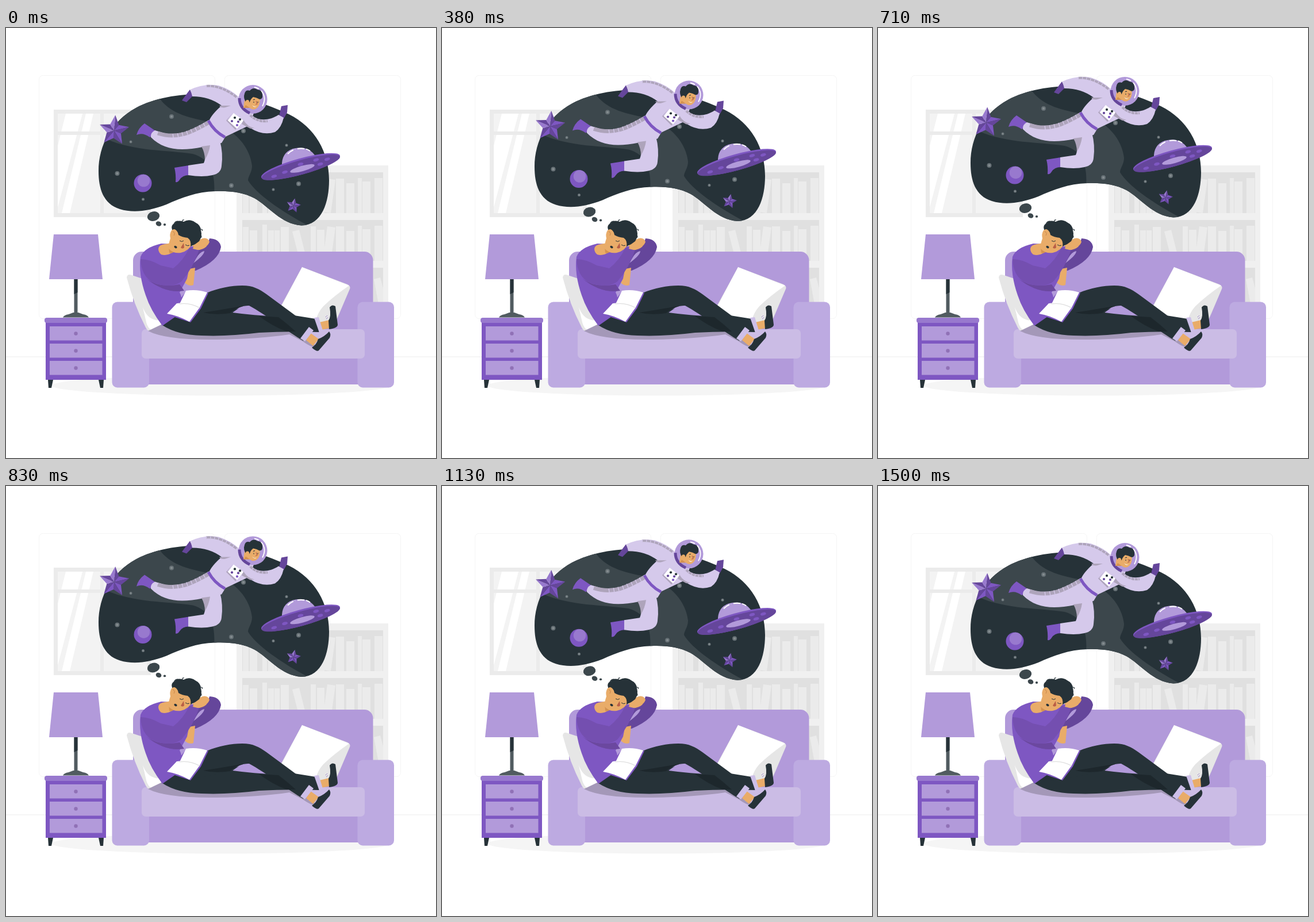
An HTML page with a canvas for the animation above (1.54 s loop, 748 by 748 pixels).

```html
<!DOCTYPE html>
<html lang="en">
<head>
<meta charset="utf-8">
<title>Space dream</title>
<style>
html, body { margin: 0; width: 100%; height: 100%; overflow: hidden; background: #fff; }
canvas { display: block; }
</style>
</head>
<body>
<canvas id="stage" width="748" height="748"></canvas>
<script>
const ctx = document.getElementById('stage').getContext('2d');
const INK = '#263238', SLATE = '#3c474c', PURPLE = '#7e57c2', DEEP = '#65469b';
const MID = '#9879ce', LILAC = '#b29ada', SUIT = '#d5c9eb', SKIN = '#e9ac69';
const SEAM = '#aea4bb', PALE = '#ebebeb', MIST = '#f5f5f5', WHITE = '#fff';

const fill = (color, d) => { ctx.fillStyle = color; ctx.fill(new Path2D(d)); };
const line = (color, width, d, dash = []) => {
  ctx.strokeStyle = color;
  ctx.lineWidth = width;
  ctx.setLineDash(dash);
  ctx.stroke(new Path2D(d));
  ctx.setLineDash([]);
};
const rect = (color, x, y, w, h, r = 0) => {
  ctx.fillStyle = color;
  ctx.beginPath();
  ctx.roundRect(x, y, w, h, r);
  ctx.fill();
};
const oval = (color, x, y, rx, ry = rx, turn = 0) => {
  ctx.fillStyle = color;
  ctx.beginPath();
  ctx.ellipse(x, y, rx, ry, turn, 0, 7);
  ctx.fill();
};
const clipped = (d, draw) => {
  ctx.save();
  ctx.clip(new Path2D(d));
  draw();
  ctx.restore();
};

function room() {
  rect(WHITE, 0, 0, 748, 748);
  ctx.strokeStyle = MIST;
  ctx.lineWidth = 1;
  for (const x of [57.5, 380.5]) {
    ctx.beginPath();
    ctx.roundRect(x, 82.5, 306, 423, 7);
    ctx.stroke();
  }
  rect(PALE, 0, 571.5, 748, 1);

  rect(PALE, 83, 142, 169, 187);
  rect('#f3f3f3', 90, 149, 155, 173);
  clipped('M90 149H164V322H90Z', () => {
    fill(WHITE, 'M104 149H133L90 312V205Z');
    fill(WHITE, 'M139 149H152L111 322H97Z');
  });
  rect(PALE, 164, 149, 6, 173);
  rect(PALE, 90, 180, 155, 6);

  rect('#f0f0f0', 401, 239, 264, 270);
  rect('#e0e0e0', 411, 251, 245, 258);
  for (const y of [-83, 0]) {
    const books = [[412, 346, 10], [424, 352, 13], [446, 342, 8], [456, 352, 10], [467, 352, 9],
      [478, 346, 14], [530, 345, 9], [541, 351, 13], [574, 345, 14], [592, 353, 14],
      [612, 344, 7], [620, 350, 14], [641, 344, 14]];
    for (const [x, top, w] of books) rect(PALE, x, top + y, w, 405 - top);
    ctx.save();
    ctx.translate(0, y);
    fill(PALE, 'M498 354L510 351L523 403L511 405ZM559 345L573 347L565 405L551 403Z');
    ctx.restore();
  }
  fill(PALE, 'M640 437L651 434L663 480H648Z');
  rect('#f0f0f0', 401, 322, 264, 12);
  rect('#f0f0f0', 401, 405, 264, 12);
  rect('#f0f0f0', 656, 239, 9, 270);
  oval(MIST, 374, 622, 294, 17.5);
}

function furniture() {
  rect(LILAC, 221, 389, 417.5, 200, 15);
  rect(LILAC, 235, 560, 390, 60);
  rect('#bdaae1', 184.5, 476.5, 64.5, 149, 9);
  rect('#bdaae1', 611.5, 476.5, 63.5, 149, 9);
  rect('#cbbce5', 236, 524, 388, 51, 7);

  fill(LILAC, 'M83 359H160L168 437H75Z');
  rect('#515b60', 118.5, 437, 6, 64);
  fill(INK, 'M118.5 437H124.5V460L118.5 463Z');
  fill('#515b60', 'M99 503.5Q101 499 109 498L117 495H126L134 498Q142 499 144 503.5Z');
  rect(PURPLE, 69, 511, 105, 101);
  rect(MID, 67, 504, 109, 9, 4);
  for (const y of [519, 549, 579]) {
    rect(LILAC, 76, y, 91.5, 24.5);
    oval('#9071b6', 121.5, y + 12.5, 3.2);
  }
  fill(INK, 'M73 612H82L79 626H74ZM161 612H170L169 626H164Z');

  fill('#e6e6e6', 'M515 416L594 446Q600 449 598 454L572 515Q568 524 552 522L490 510L478 484Z');
  fill(WHITE, 'M515 416L597 448Q572 465 552 484Q542 495 538 511L500 508L479 484Z');
  fill('#e6e6e6', 'M210 434Q211 427 219 430L240 437L276 516L258 527Q248 531 243 521Q222 480 210 434Z');
  fill(WHITE, 'M238 486Q248 512 272 508L276 516L258 527Q248 526 244 512Z');
}

function legs() {
  fill('#a498b8', 'M247 527L274 514L515 526L541 556Q533 557 516 545L493 533Q440 541 365 542Q278 543 247 527Z');
  fill(INK, 'M280 506Q330 480 375 491L420 487L539 506L545 529Q490 527 440 530Q385 537 340 535Q298 534 272 517Z');
  fill(LILAC, 'M394 495Q408 484 423 483Q448 487 475 502Q430 500 394 495Z');
  fill(INK, 'M272 517L307 494L349 461C370 452 392 448 411 448C430 448 440 454 453 463L533 522L517 544C491 529 451 498 423 483Q406 482 394 495L340 507Z');
  fill('#1d272c', 'M343 495Q375 490 416 483Q398 487 390 496Q364 500 343 495Z');
  fill('#1d272c', 'M440 501L474 503Q490 515 504 528L488 528Q462 518 440 501Z');

  fill(SKIN, 'M545 512L562 508L564 522L548 525Z');
  fill('#cdbfe8', 'M536 504L544 503L551 526L545 530Z');
  fill(INK, 'M563 486Q567 480 573 484L577 516Q577 522 562 524L561 509Q566 502 563 486Z');
  line(PURPLE, 1, 'M556 503L559 500M557 506L561 503', [1.5, 1]);
  fill(SKIN, 'M530 531L544 541L534 553L522 543Z');
  fill('#cdbfe8', 'M527 520L535 526L520 545L512 540Z');
  fill(INK, 'M562 528Q566 532 563 539L544 561Q541 564 532 556Q540 551 543 541Q554 537 562 528Z');
}

function sleeper() {
  fill(DEEP, 'M335 386Q350 382 354 366Q372 367 374 381Q370 405 330 422L307 424L315 399Z');
  fill(LILAC, 'M330 402Q337 389 345 388Q345 395 326 409Z');
  fill(SKIN, 'M314 420L329 417L326 447Q317 451 307 439Z');
  fill(SKIN, 'M320 386Q329 370 342 366Q351 364 354 372Q350 383 333 386Z');

  fill(PURPLE, 'M234 398Q240 382 270 375L300 376L326 380L315 436L302 460Q311 475 295 502L272 518Q251 490 243 465Q230 428 234 398Z');
  fill('#6b489f', 'M244 436Q266 453 302 446L310 457Q278 463 244 436Z');
  fill('#744fb0', 'M234 402Q250 402 269 413L291 418Q309 404 319 382L336 386Q326 417 305 441Q288 454 256 443Q235 431 234 402Z');
  fill(SKIN, 'M265 384Q266 377 276 376L287 374L290 390Q280 397 270 394Q265 390 265 384Z');
  fill('#d39150', 'M283 380L293 389Q288 393 284 391Z');

  fill(SKIN, 'M288 352Q284 358 286 366Q282 377 283 384Q292 393 304 391Q318 388 325 374L322 350L301 343Z');
  fill(INK, 'M289 351Q286 343 293 340Q297 333 309 337Q319 331 329 338Q339 343 339 352Q342 362 336 371Q329 377 321 380Q323 370 316 365Q306 364 300 360Q299 350 289 351Z');
  line(INK, 1.2, 'M292 341Q294 336 299 336M307 337Q306 333 310 334M338 350Q343 350 341 353M336 360Q342 361 339 365');
  oval(SKIN, 292, 357.5, 5.5, 7.5, 0.2);
  line('#c5864b', 1, 'M290 354Q295 356 292 361');
  line(INK, 1, 'M302 370Q306 373 309 370M312 377Q316 380 319 378');
  fill('#b95e46', 'M309 374L304 382Q307 385 310 382Z');
  oval(INK, 295, 381, 2.8, 1.9, 0.5);
  fill(SKIN, 'M325 384Q331 372 341 374L349 380Q342 386 333 386Z');

  fill(PURPLE, 'M314 457L352 461L339 488L321 512L282 499Z');
  fill(WHITE, 'M313 457Q332 454 350 460L337 486Q320 478 302 480Z');
  fill(WHITE, 'M297 479Q320 476 337 486L319 511Q299 500 280 497Z');
  line('#dedede', 1.2, 'M301 480Q320 477 337 487');
}

const CLOUD = 'M161 249C161 203 184 162 226 139C266 118 319 112 370 116C414 119 453 132 492 150C538 173 562 216 562 265C562 302 550 343 514 343.500C478 341 457 310 432 296C413 286 389 283 364 284C331 285 306 295 279 307C248 319 221 322 198 315C169 306 161 279 161 249Z';

function star(x, y, size, angle) {
  const point = i => {
    const a = angle + i * Math.PI / 5, r = i % 2 ? size * 0.48 : size;
    return [x + r * Math.cos(a), y + r * Math.sin(a)];
  };
  for (let i = 0; i < 10; i++) {
    ctx.beginPath();
    ctx.moveTo(x, y);
    ctx.lineTo(...point(i));
    ctx.lineTo(...point(i + 1));
    ctx.fillStyle = i % 2 ? (i > 5 ? MID : PURPLE) : DEEP;
    ctx.fill();
  }
}

function space() {
  fill(INK, CLOUD);
  clipped(CLOUD, () => fill(SLATE, 'M264 118C280 143 305 154 348 162C402 174 425 211 428 240C428 251 421 258 421 265C435 289 482 321 530 346L440 360L362 290C364 260 360 229 325 219C280 212 224 215 174 193L200 100Z'));
  for (const [x, y, r] of [[288, 154, 4], [413, 179, 4], [193.5, 253, 4], [392, 274, 4], [509, 271, 4],
    [217, 198, 2.5], [488, 204, 2.5], [465, 281, 2.5], [238.5, 298, 2.5]]) {
    oval('#667075', x, y, r);
    oval('#858d90', x, y, r * 0.5);
  }
  oval(PURPLE, 238, 270, 15.5);
  oval(MID, 239.500, 265.500, 10.8);
  star(188, 178.5, 27, -1.49);
  star(500, 309, 13, -1.37);
  oval(SLATE, 256.500, 327.500, 10.8, 8.3, -0.25);
  oval(SLATE, 265.500, 340.500, 5, 4, 0.4);
  oval(SLATE, 276, 342, 2.2, 1.9);
}

function saucer() {
  fill(LILAC, 'M480 240Q479 217 499 210Q526 203 539 224Q526 240 480 240Z');
  line(WHITE, 2, 'M490 219Q496 213 503 211M507 210Q521 208 529 214', [12, 3]);
  ctx.save();
  ctx.translate(512.5, 241);
  ctx.rotate(-0.27);
  oval(PURPLE, 0, 0, 71, 14);
  oval(DEEP, 0, 1.5, 70.5, 12.5);
  oval(LILAC, 2, 4, 22, 4.8);
  for (const [x, y] of [[-49, 4], [-29, 2], [1, -4], [29, -4], [48, 0], [34, 5]]) oval(PURPLE, x, y, 5, 2.6);
  ctx.restore();
}

function astronaut() {
  fill(PURPLE, 'M227 186Q230 174 241 166L260 179Q256 187 250 190Q238 181 227 186Z');
  fill(SUIT, 'M353 160C331 172 310 191 279 184L259 178Q251 182 252 190C274 212 302 215 342 207L375 200L383 187Z');
  line(SEAM, 7, 'M264 183C298 194 322 182 355 163');
  line(SUIT, 7, 'M290 188C315 185 333 175 353 164', [1.3, 7]);
  fill(PURPLE, 'M293 243L318 239L318 256Q307 256 302 264Q299 269 295 268Q296 255 293 243Z');
  fill(SUIT, 'M342 203Q351 217 344 235L317 239V256Q342 260 359 256Q374 253 375 240Q378 218 372 196Z');
  fill(SEAM, 'M340 206L355 204Q353 218 346 229Q346 217 340 206Z');

  fill(DEEP, 'M306 126L314 115L320 107L325 118L314 129Z');
  fill(SUIT, 'M321 107Q344 96 370 100Q392 107 406 121L396 151L375 135Q354 119 324 119Z');
  line(SEAM, 4, 'M348 101Q374 99 402 121');
  line(SUIT, 4, 'M348 101Q374 99 402 121', [1.2, 6]);
  fill(SUIT, 'M375 135L404 120L431 148L424 169L382 189L353 162Q357 151 375 135Z');
  fill(SEAM, 'M371 135H391L382 138Q374 140 371 135Z');
  line(PURPLE, 5, 'M352 161Q362 180 381 190');
  fill(DEEP, 'M475 153L479 136L490 134L489 147L483 158Z');
  fill(SUIT, 'M421 147C434 162 456 163 474 151L483 156Q479 174 468 181Q447 188 425 174L410 164Z');
  line(SEAM, 4, 'M424 151Q437 164 455 162');
  line(SUIT, 4, 'M424 151Q437 164 455 162', [1.2, 5]);
  fill(SEAM, 'M413 160Q420 172 432 174L425 175L410 167Z');

  fill(SEAM, 'M394 148L385 160L401 175L399 177L383 161Z');
  fill(WHITE, 'M396 148L413 161L402 175L386 161Z');
  for (const [x, y, color] of [[398, 156, INK], [404, 163, DEEP], [393, 162, DEEP], [402, 169, PURPLE], [407, 159, INK]]) oval(color, x, y, 2.1);

  oval(LILAC, 429.500, 124, 25);
  line(DEEP, 5, 'M406 122Q406 140 424 148');
  fill(SKIN, 'M416 120L441 117Q444 136 434 141Q428 143 424 139L413 139Q414 130 416 120Z');
  fill('#d39150', 'M417 134L424 139L414 139Z');
  fill(INK, 'M418 130Q412 122 415 114Q417 107 424 109Q430 102 437 107Q446 108 446 116Q447 124 441 124Q436 121 430 120Q425 124 424 129Z');
  oval(SKIN, 420, 129, 3.2, 4);
  line(INK, 1.1, 'M430 125L433 124M431 128V130M438 128V130');
  line('#b95e46', 1.2, 'M435 127L437 132L434 133');
  fill(WHITE, 'M428 134Q432 138 436 136Q432 140 428 134Z');
  line(WHITE, 1.8, 'M444 109Q454 121 446 136M432 103Q437 104 440 106');
}

// The dream rises and falls evenly by 15 px every 1.5 s, at 24 pictures a second.
const LOOP = 1540, PERIOD = 1500, RISE = 15, START = 45;
const height = ms => RISE * (1 - Math.abs(1 - 2 * ((ms + START) % PERIOD) / PERIOD));

function draw(now) {
  const step = Math.floor((now % LOOP + 5.01) * 0.024);
  room();
  furniture();
  legs();
  sleeper();
  ctx.save();
  ctx.translate(0, height(0) - height(step * 1000 / 24));
  space();
  saucer();
  astronaut();
  ctx.restore();
}

const begin = performance.now();
function tick() {
  draw(performance.now() - begin);
  requestAnimationFrame(tick);
}
tick();
</script>
</body>
</html>
```
